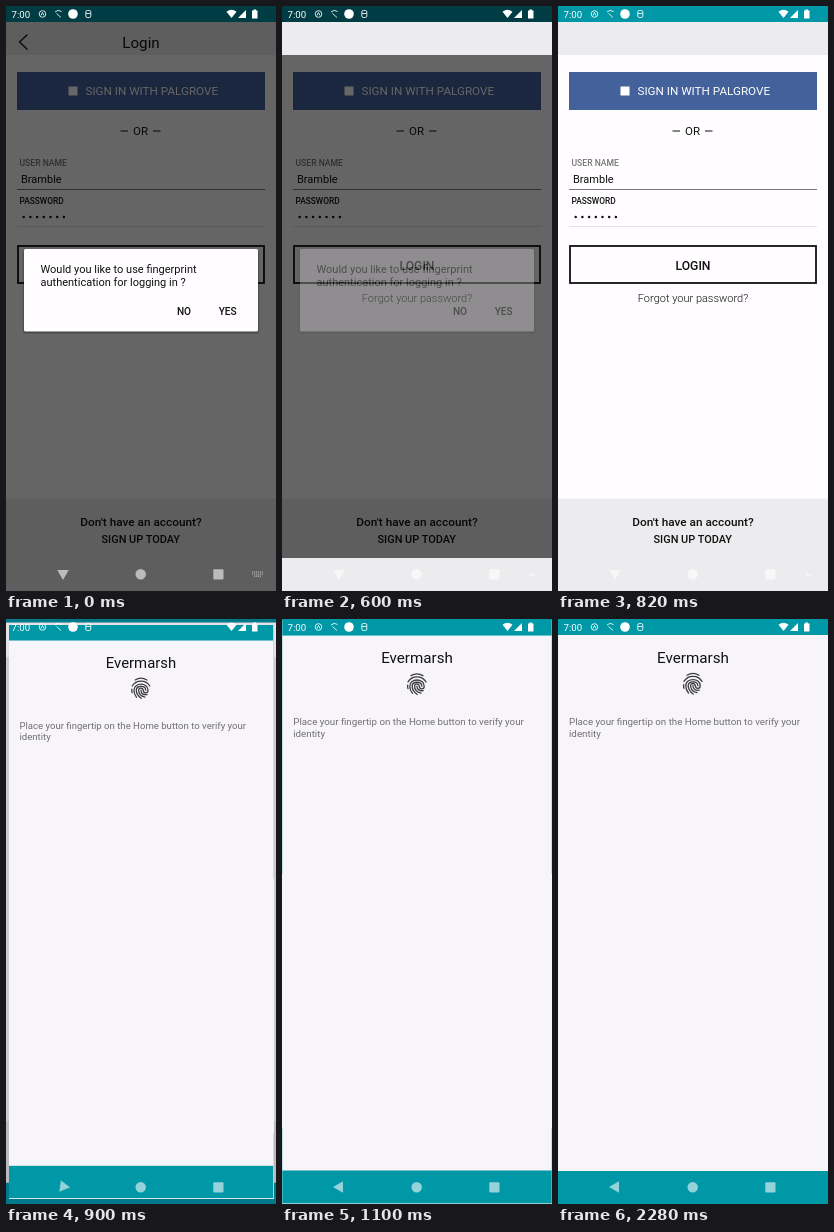
Write an HTML page that moves like this. It is 270 by 585 pixels and loops after 3000 ms.

```html
<!DOCTYPE html>
<html lang="en">
<head>
<meta charset="utf-8">
<title>Fingerprint login</title>
<style>
  html, body { margin: 0; width: 100%; height: 100%; overflow: hidden; background: #f7f5fa; }
  svg { display: block; width: 100%; height: 100%; }
  text { font-family: Roboto, "Noto Sans", sans-serif; fill: #111; }
  .mid { text-anchor: middle; }
  .bold { font-weight: 500; }
  .teal { fill: #0097a7; }
  .bar { fill: #ecebee; }
  .white { fill: #fff; }
  .line { fill: none; stroke: #fff; }

  /* every layer shares one 3 s clock and changes in hard steps */
  .t { animation: 3s step-end infinite; }
  .login { animation-name: login; }
  .title, .dim, .keys { animation-name: title; }
  .dim-body { animation-name: fading; }
  .dialog { animation-name: dialog; }
  .secure { animation-name: secure; transform-origin: 135px 292.5px; }
  .far { animation-name: far; }
  .near { animation-name: near; }
  .back { animation-name: back; transform-origin: 57px 568px; }
  .corner { animation-name: corner; }

  @keyframes login { 0% { visibility: visible } 30%, 100% { visibility: hidden } }
  @keyframes title { 0% { opacity: 1 } 20%, 100% { opacity: 0 } }
  @keyframes fading { 0% { opacity: 0 } 20% { opacity: 1 } 23.333%, 100% { opacity: 0 } }
  @keyframes dialog { 0% { opacity: 1 } 20% { opacity: .27 } 23.333%, 100% { opacity: 0 } }
  @keyframes secure {
    0% { opacity: 0; transform: scale(.98) }
    30% { opacity: 1; transform: scale(.98) }
    33.333% { opacity: 1; transform: scale(.992) }
    36.667% { opacity: 1; transform: scale(.998) }
    40%, 100% { opacity: 1; transform: scale(1) }
  }
  @keyframes far { 0% { opacity: 0 } 30% { opacity: 1 } 33.333%, 100% { opacity: 0 } }
  @keyframes near { 0% { opacity: 0 } 33.333% { opacity: 1 } 36.667%, 100% { opacity: 0 } }
  @keyframes back {
    0% { transform: rotate(-90deg) }
    30% { transform: rotate(-52deg) }
    33.333% { transform: rotate(-8deg) }
    36.667%, 100% { transform: rotate(0deg) }
  }
  @keyframes corner { 0% { opacity: 0 } 20% { opacity: .8 } 30%, 100% { opacity: 0 } }
</style>
</head>
<body>
<svg viewBox="0 0 270 585" preserveAspectRatio="none">
  <!-- base seen around the settling window -->
  <rect class="teal" width="270" height="585"/>
  <rect y="16" width="270" height="536" fill="#f7f5fa"/>

  <!-- login screen -->
  <g class="t login">
    <rect y="16" width="270" height="569" fill="#fffdff"/>
    <rect class="teal" width="270" height="16"/>
    <rect class="bar" y="16" width="270" height="33"/>
    <rect class="bar" y="492.500" width="270" height="92.500"/>
    <g class="t title">
      <path d="M21.500 28.500L13.500 36l8 7.500" fill="none" stroke="#111" stroke-width="1.300"/>
      <text class="mid" x="135" y="41.700" font-size="15.200">Login</text>
    </g>

    <rect x="11" y="66" width="248" height="38" fill="#43619b"/>
    <rect class="white" x="62.500" y="80.500" width="9" height="9"/>
    <text x="79.500" y="89.400" font-size="11.700" style="fill:#fff">SIGN IN WITH PALGROVE</text>

    <path d="M114.500 125h7.500M147 125h7.500" stroke="#111" stroke-width="1.200"/>
    <text class="mid" x="134.500" y="129.200" font-size="11.500">OR</text>

    <text class="bold" x="13.500" y="160.200" font-size="8.600" style="fill:#777">USER NAME</text>
    <text x="15" y="177.300" font-size="11">Bramble</text>
    <path d="M11 183.500h248" stroke="#777"/>
    <text class="bold" x="13.500" y="197.800" font-size="8.400">PASSWORD</text>
    <path d="M17.700 211h41" stroke="#111" stroke-width="2.500" stroke-linecap="round" stroke-dasharray="0 6.700"/>
    <path d="M11 220.500h248" stroke="#e2e1e3"/>

    <rect x="12" y="240" width="246" height="37" fill="none" stroke="#111" stroke-width="1.800"/>
    <text class="mid bold" x="135" y="263.700" font-size="12.200">LOGIN</text>
    <text class="mid" x="135" y="295.600" font-size="11" font-weight="300">Forgot your password?</text>

    <text class="mid bold" x="135" y="520" font-size="11.800">Don't have an account?</text>
    <text class="mid bold" x="134.700" y="536.500" font-size="10.950">SIGN UP TODAY</text>

    <rect class="t dim" width="270" height="585" fill-opacity=".6"/>
    <path class="t dim-body" d="M0 0h270v16H0zM0 49h270v503H0z" fill-opacity=".6"/>

    <g class="t dialog">
      <rect x="16.500" y="244" width="237" height="84" rx="3" fill-opacity=".12"/>
      <rect x="17.500" y="244" width="235" height="83" rx="2" fill-opacity=".2"/>
      <rect x="18" y="243" width="234" height="82.500" rx="1.500" fill="#fffdff"/>
      <g font-size="11">
        <text x="34.500" y="267">Would you like to use fingerprint</text>
        <text x="34.500" y="279.900">authentication for logging in ?</text>
      </g>
      <g class="mid bold" font-size="10.100">
        <text x="178" y="308.500">NO</text>
        <text x="221.700" y="308.500">YES</text>
      </g>
    </g>
  </g>

  <!-- receding screen behind the new window -->
  <g class="t far">
    <rect width="270" height="585" fill="#cccacd"/>
    <rect y="3.600" width="270" height="34.400" fill="#e4e2e5"/>
    <rect y="502" width="270" height="62" fill="#bbb9bc"/>
    <path d="M0 0h270v3.600H0zM0 563.700h270V585H0z" fill="#007a8a"/>
  </g>
  <g class="t near">
    <rect width="270" height="585" fill="#66666c"/>
    <path d="M0 0h270v3H0zM0 564h270v21H0z" fill="#00606f"/>
  </g>

  <!-- fingerprint window -->
  <g class="t secure">
    <rect class="teal" width="270" height="585"/>
    <rect y="16" width="270" height="536" fill="#f7f5fa"/>
    <text class="mid" x="135" y="43.700" font-size="15.200">Evermarsh</text>
    <g transform="translate(135 64.700)" fill="none" stroke="#3c3b3e" stroke-width="1.300" stroke-linecap="round">
      <path d="M-6-8.500Q0-12 6-8.500"/>
      <path d="M-9-2.300C-5-9 5-9 9-2.300"/>
      <path d="M-4.500 9.300C-6.500 7-7.200 5-7.200 2C-7.200-6.200 7.200-6.200 7.200 2C7.200 5.500 2.800 5.500 2.400 2.500C2-1-2.400-1-2.400 2C-2.400 6 0 8 4 9"/>
      <path d="M.2 10.300C-3.500 7.500-4.800 5-4.800 2C-4.800-3.200 4.800-3.200 4.800 2"/>
      <path d="M0 2C0 5.500 2.500 7 6.200 6.500"/>
      <path d="M-9 4.500Q-9.700 3-9.300 1"/>
    </g>
    <g font-size="9.780">
      <text x="11" y="106" style="fill:#706f72">Place your fingertip on the Home button to verify your</text>
      <text x="11" y="117.500" style="fill:#706f72">identity</text>
    </g>
  </g>

  <!-- status icons -->
  <text x="5.500" y="11.700" font-size="9.700" style="fill:#fff">7:00</text>
  <g class="line" stroke-opacity=".85">
    <circle cx="36.500" cy="8" r="3.300"/>
    <path d="M35 9.500l1.500-3 1.500 3"/>
    <path d="M49 6q3-3 6.500-.5M50.500 7.500l4.500 4"/>
    <rect x="79.800" y="4.500" width="5" height="7" rx="1.500"/>
    <path d="M80 7.500h4.500"/>
  </g>
  <circle class="white" cx="67" cy="8" r="4.800"/>
  <path class="white" d="M220.500 5.800Q225.500 1.800 230.500 5.800L225.500 12z"/>
  <path class="white" d="M232 12L240 4v8z"/>
  <path class="white" d="M246 4.500h1.500v-1h2.500v1h1.500V12.500H246z"/>

  <!-- navigation icons -->
  <g class="white" fill-opacity=".58">
    <path class="t back" d="M51 568L61 562.200v11.600z"/>
    <circle cx="134.700" cy="568.200" r="5.200"/>
    <rect x="207.300" y="563.200" width="10.200" height="10.200" rx="1"/>
    <path class="t corner" d="M248 566l6.500 4.500H248z"/>
  </g>
  <path class="t keys line" stroke-opacity=".58" stroke-width="1.200" stroke-dasharray="1.200 .8"
    d="M246 566h11M246 568h11M248 570.200h7"/>
</svg>
</body>
</html>
```
